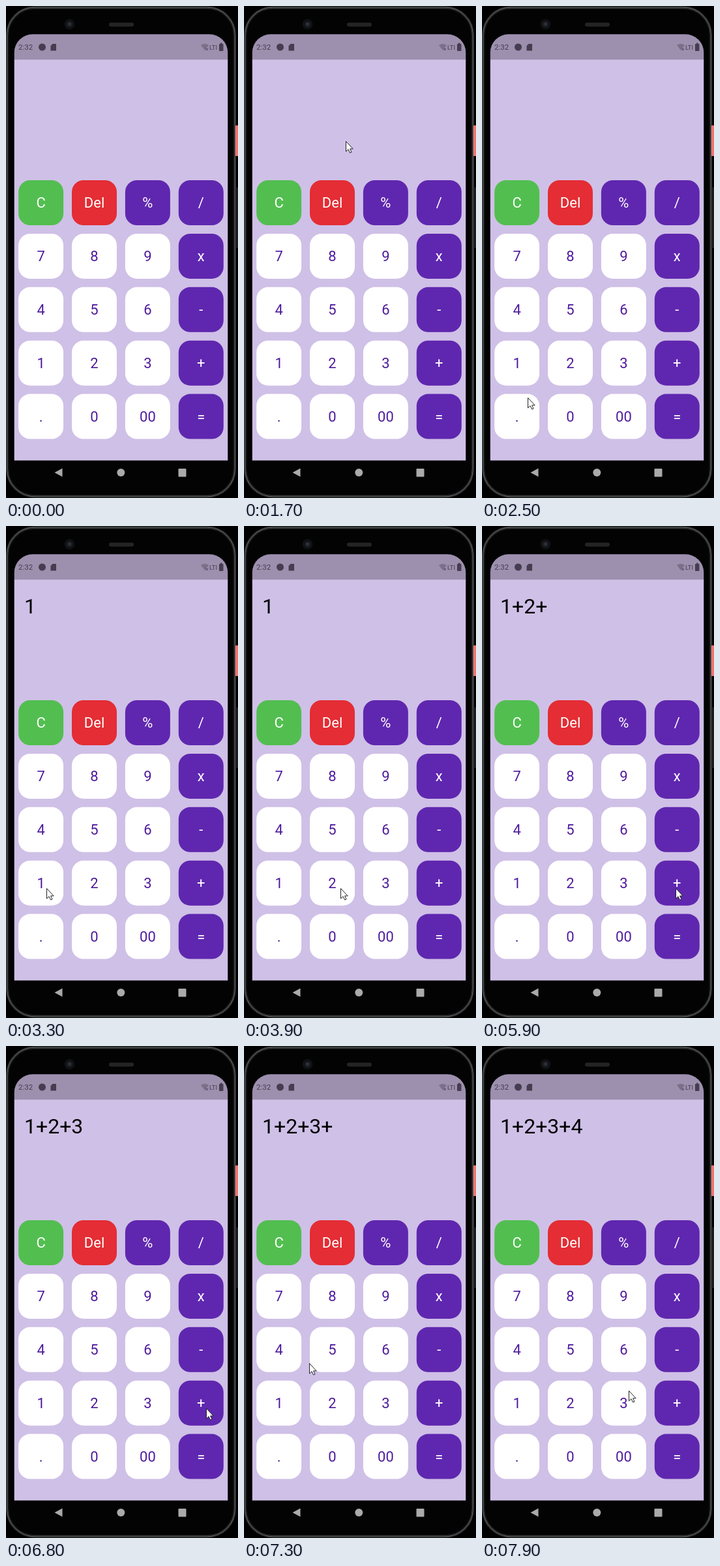
An HTML page with a canvas for the animation above (8 s loop, 356x754 px).

```html
<!DOCTYPE html>
<html lang="en">
<head>
<meta charset="utf-8">
<title>Calculator</title>
<style>
html, body { margin: 0; width: 100%; height: 100%; overflow: hidden; background: #000; }
canvas { display: block; width: 356px; height: 754px; }
</style>
</head>
<body>
<canvas id="stage"></canvas>
<script>
const W = 356, H = 754, LOOP = 8000, STEP = 100;
const FONT = 'Roboto, sans-serif';
const SCREEN = { x: 12.7, w: 327.6 };
const KEY = 69, PITCH = 81.9, LEFT = 19.1, TOP = 267;
const ROWS = ['C|Del|%|/', '7|8|9|x', '4|5|6|-', '1|2|3|+', '.|0|00|='].map(r => r.split('|'));

const canvas = document.getElementById('stage');
const dpr = window.devicePixelRatio || 1;
canvas.width = W * dpr;
canvas.height = H * dpr;
const ctx = canvas.getContext('2d');
ctx.scale(dpr, dpr);

// Idle pointer movement, then the keys pressed in turn
const WANDER = [
  { at: 900, x: 43, y: 320 },
  { at: 1400, x: 147, y: 190 },
  { at: 1700, x: 156, y: 207 },
  { at: 1900, x: 194, y: 92 },
  { at: 2500, x: 70, y: 600 }
];
const MOVE = 600, SETTLE = 100;
const PRESSES = [
  ['1', 3200], ['+', 4360], ['2', 5000], ['+', 5700],
  ['3', 6350], ['+', 6900], ['4', 7500], ['+', 8190]
].map(([key, at]) => ({ key, at, ...pointerOn(key) }));

const LEGS = [
  ...WANDER.slice(1).map((to, i) => leg(WANDER[i], to, WANDER[i].at, to.at)),
  ...PRESSES.map((to, i) => {
    const from = PRESSES[i - 1] || WANDER[WANDER.length - 1];
    const end = to.at - SETTLE;
    return leg(from, to, Math.max(end - MOVE, from.at + SETTLE), end);
  })
];

function leg(from, to, start, end) {
  return { from, to, start, end };
}

function pointerOn(key) {
  const row = ROWS.findIndex(r => r.includes(key));
  const col = ROWS[row].indexOf(key);
  return { x: LEFT + col * PITCH + KEY / 2 + 8, y: TOP + row * PITCH + KEY / 2 + 8 };
}

function pointerAt(t) {
  const { from, to, start, end } = LEGS.filter(l => l.start <= t).pop();
  const u = Math.min((t - start) / (end - start), 1);
  const k = u * u * (3 - 2 * u);
  return [from.x + (to.x - from.x) * k, from.y + (to.y - from.y) * k];
}

function box(x, y, w, h, r, fill, stroke, width = 1) {
  ctx.beginPath();
  ctx.roundRect(x, y, w, h, r);
  if (fill) { ctx.fillStyle = fill; ctx.fill(); }
  if (stroke) { ctx.strokeStyle = stroke; ctx.lineWidth = width; ctx.stroke(); }
}

function disc(x, y, r, fill) {
  ctx.beginPath();
  ctx.arc(x, y, r, 0, Math.PI * 2);
  ctx.fillStyle = fill;
  ctx.fill();
}

function shape(path, fill, stroke) {
  const p = new Path2D(path);
  if (fill) { ctx.fillStyle = fill; ctx.fill(p); }
  if (stroke) { ctx.strokeStyle = stroke; ctx.lineWidth = 1; ctx.stroke(p); }
}

function label(text, x, y, size, fill, align = 'left') {
  ctx.font = `${size}px ${FONT}`;
  ctx.textAlign = align;
  ctx.fillStyle = fill;
  ctx.fillText(text, x, y);
}

function drawPhone() {
  ctx.fillStyle = '#000';
  ctx.fillRect(0, 0, W, H);
  ['#232425', '#5a5b5d', '#38393b', '#121213'].forEach((tone, i) => {
    const d = 0.5 + i * 1.2;
    box(d, d + 0.5, 353 - 2 * d, 753 - 2 * d, 44 - d, '#030303', tone, 1.3);
  });
  box(352, 183, 5, 47, 1, '#ee756f');
  box(352, 278, 5, 93, 1, '#1c1d1e');
  box(158, 25.5, 38, 6, 3, '#242424');
  disc(97.5, 28, 8, '#101113');
  disc(97.5, 28, 4, '#20232a');
  disc(97.5, 27.5, 1.5, '#383b45');
}

function drawStatus() {
  const ink = '#453d50';
  box(SCREEN.x, 43.3, SCREEN.w, 39, [28, 28, 0, 0], '#9d8fae');
  label('2:32', 19, 67, 11.5, ink);
  disc(55.5, 63, 5.5, ink);
  shape('M71.5 58h5.5v10.5h-8.5v-7.5z', ink);
  shape('M299 60Q305 56 311 60L305 68z', '#7b7089');
  shape('M306.5 64.5l3.5 3.5m0-3.5l-3.5 3.5', null, ink);
  label('LTI', 312, 66.5, 9.5, ink);
  box(327, 58, 6.5, 11, 1, ink);
  box(329, 56.5, 2.5, 2, 0, ink);
}

function drawKeys() {
  const special = { C: '#52be50', Del: '#e42d34' };
  ROWS.forEach((row, r) => row.forEach((key, c) => {
    const x = LEFT + c * PITCH, y = TOP + r * PITCH;
    const plain = r > 0 && c < 3;
    box(x, y, KEY, KEY, 18, special[key] || (plain ? '#fff' : '#5f27af'));
    label(key, x + KEY / 2, y + 42.3, 22, plain ? '#4f1b9c' : '#fff', 'center');
  }));
}

function drawNav() {
  const ink = '#aaa';
  shape('M74.5 715l12-6.5v13z', ink);
  disc(176.3, 715, 6, ink);
  box(264.5, 709, 12, 12.5, 1, ink);
}

function drawPointer(t) {
  const [x, y] = pointerAt(t);
  ctx.save();
  ctx.translate(Math.round(x) + 0.5, Math.round(y) + 0.5);
  shape('M0 0v15.5l3.5-3.3 2.6 5.3 2.4-1-2.4-5.1h4.6z', '#fff', '#222');
  ctx.restore();
}

function draw(t) {
  drawPhone();
  box(SCREEN.x, 82, SCREEN.w, 614.4, 0, '#cfc0e7');
  drawStatus();
  drawKeys();
  drawNav();
  const typed = PRESSES.filter(p => p.at <= t).map(p => p.key).join('');
  label(typed, 28, 133.6, 32, '#000');
  if (t >= WANDER[0].at) drawPointer(t);
}

const start = performance.now();
function tick() {
  const t = (performance.now() - start) % LOOP;
  draw(Math.floor(t / STEP) * STEP);
  requestAnimationFrame(tick);
}
tick();
</script>
</body>
</html>
```
